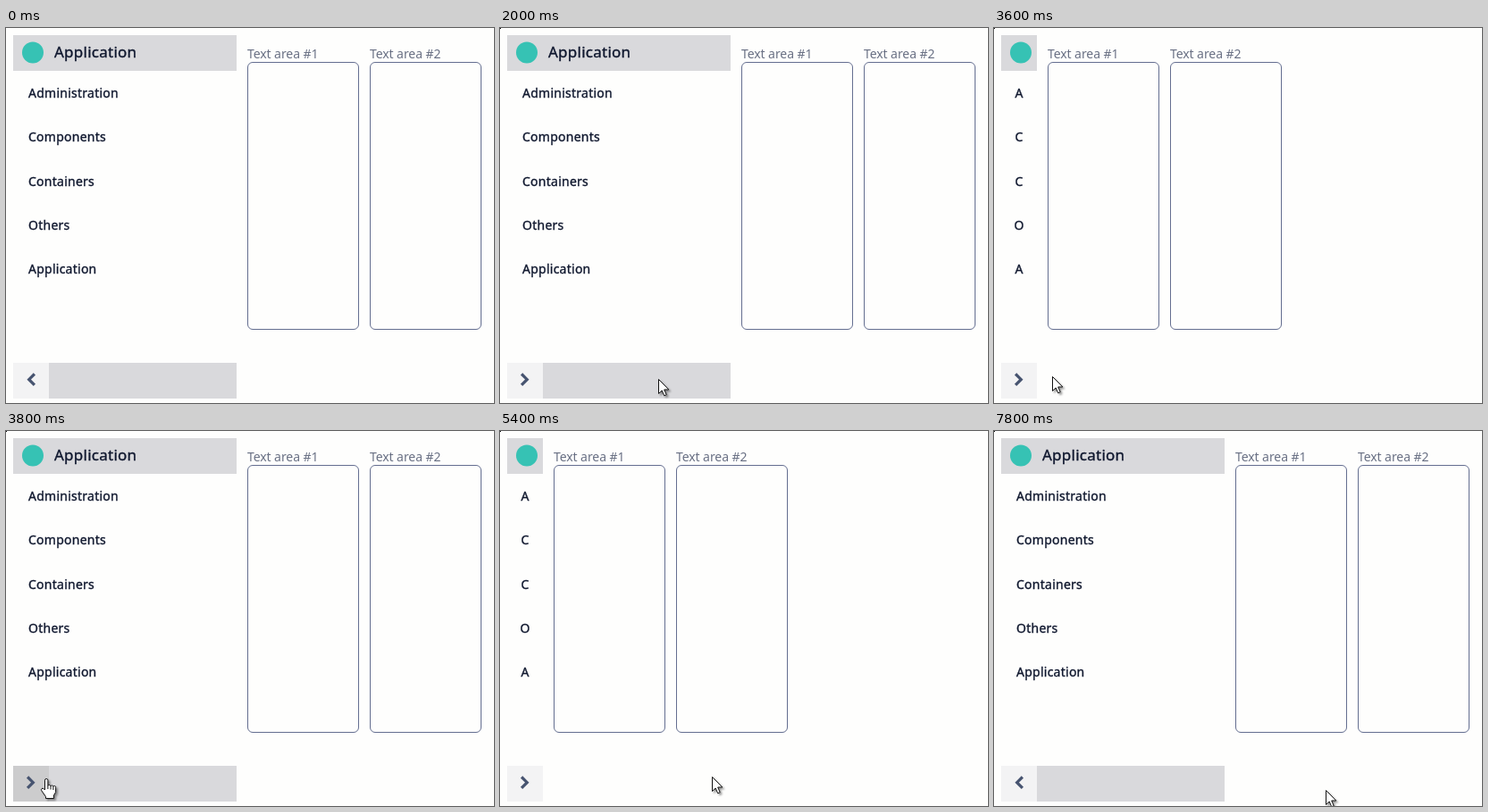
Write an HTML page that moves like this. It is 546 px wide and 420 px high and loops after 8 s.

```html
<!DOCTYPE html>
<html lang="en">
<head>
<meta charset="utf-8">
<title>Collapsible sidebar</title>
<style>
  html, body { margin: 0; width: 100%; height: 100%; overflow: hidden; background: #fefefd; }
  svg { display: block; width: 100%; height: 100%; font: 14px "Noto Sans", "Open Sans", sans-serif; }
  .bar { fill: #d9d9dc; }
  .title, .item { fill: #10182f; stroke: #10182f; stroke-width: .35; letter-spacing: .25px; }
  .title { font-size: 17px; }
  .label { fill: #697084; letter-spacing: -.08px; }
  .area { fill: none; stroke: #646e90; }
  .chevron { fill: none; stroke: #475470; stroke-width: 3.2; }
  .cursor { fill: #fff; stroke: #111; stroke-linejoin: round; filter: drop-shadow(2px 2px 1.2px rgba(0, 0, 0, .4)); }
</style>
</head>
<body>
<svg viewBox="0 0 546 420">
  <rect id="dot" width="1" height="1"/>
  <rect id="head" class="bar" x="8" y="8" height="40"/>
  <circle cx="30" cy="27.5" r="12" fill="#36c2b4"/>
  <text id="title" class="title" x="54" y="33">Application</text>
  <g id="menu"></g>
  <rect id="foot" class="bar" x="8" y="375" height="40"/>
  <rect id="button" x="8" y="375" width="40" height="40"/>
  <path id="chevron" class="chevron" d="M31.9 387.5L25.7 393.7 31.9 399.9"/>
  <g id="content">
    <text class="label" x="270" y="34">Text area #1</text>
    <rect class="area" x="270.5" y="38.5" width="124" height="299" rx="5.5"/>
    <text class="label" x="407" y="34">Text area #2</text>
    <rect class="area" x="407.5" y="38.5" width="124" height="299" rx="5.5"/>
  </g>
  <g id="cursor" class="cursor">
    <path id="arrow" d="M.5 .5V16.5L4.2 13 6.7 18.8 9.2 17.7 6.7 12H11.8Z"/>
    <g id="hand">
      <path d="M-1.5 12V1.2a1.7 1.7 0 0 1 3.4 0V7.5a1.6 1.6 0 0 1 3.1 .4 1.5 1.5 0 0 1 2.9 .6 1.4 1.4 0 0 1 2.7 .8V14.5L8.5 18V21.5H-.5V19.5L-5.2 12.8a1.6 1.6 0 0 1 2.3-2.2Z"/>
      <path fill="none" d="M1.9 7.5V11M5 8V11.5M7.9 8.6V12"/>
    </g>
  </g>
</svg>
<script>
const LOOP = 8000, STEP = 200;
const $ = id => document.getElementById(id);
const show = (id, on) => $(id).setAttribute('visibility', on ? 'inherit' : 'hidden');
const mix = (a, b, k) => Math.round(a + (b - a) * k);
const within = (t, from, to) => t >= from && t < to;

// Eased progress from 0 to 1 between two times
function ease(t, from, to) {
  const k = Math.min(1, Math.max(0, (t - from) / (to - from)));
  return k * k * (3 - 2 * k);
}

// The pointer glides to the button and away again, three times
const entry = { x: 505, y: 402 };
const glides = [
  { from: 200, to: 1200, x: 40, y: 397 },
  { from: 1600, to: 2400, x: 313, y: 389 },
  { from: 2600, to: 3800, x: 45, y: 390 },
  { from: 4200, to: 5000, x: 308, y: 384 },
  { from: 5000, to: 6200, x: 35, y: 397 },
  { from: 6800, to: 7800, x: 371, y: 402 }
];

function pointer(t) {
  return glides.reduce((p, g) => {
    const k = ease(t, g.from, g.to);
    return { x: mix(p.x, g.x, k), y: mix(p.y, g.y, k) };
  }, entry);
}

const overButton = t => pointer(t).x < 48;

const items = ['Administration', 'Components', 'Containers', 'Others', 'Application'].map((name, i) => {
  const el = document.createElementNS('http://www.w3.org/2000/svg', 'text');
  el.setAttribute('class', 'item');
  el.setAttribute('y', Math.round(78 + i * 49.25));
  $('menu').append(el);
  return { el, name };
});

function setOpen(open) {
  const width = open ? 250 : 40;
  $('head').setAttribute('width', width);
  $('foot').setAttribute('width', width);
  show('title', open);
  $('content').setAttribute('transform', `translate(${width - 250} 0)`);
  for (const { el, name } of items) {
    el.textContent = open ? name : name[0];
    el.setAttribute('x', open ? 25 : 28);
    el.setAttribute('text-anchor', open ? 'start' : 'middle');
  }
}

function render(time) {
  const t = Math.floor(time % LOOP / STEP) * STEP;

  // Clicks unpin and pin the sidebar; hovering opens it meanwhile
  const pinned = !within(t, 1600, 6400);
  const hovered = within(t, 1200, 2200) || within(t, 3800, 4800) || t >= 6200;
  setOpen(pinned || hovered);

  const glow = (overButton(t) + overButton(t - STEP)) / 2;
  const grey = mix(243, 164, glow);
  $('button').setAttribute('fill', `rgb(${grey},${grey},${grey + 1})`);
  $('chevron').setAttribute('transform', pinned ? '' : 'translate(56 0) scale(-1 1)');

  const { x, y } = pointer(t);
  show('dot', t >= STEP);
  show('cursor', t >= STEP);
  show('hand', overButton(t));
  show('arrow', !overButton(t));
  $('cursor').setAttribute('transform', `translate(${x} ${y})`);
}

function tick() {
  render(performance.now());
  requestAnimationFrame(tick);
}
tick();
</script>
</body>
</html>
```
